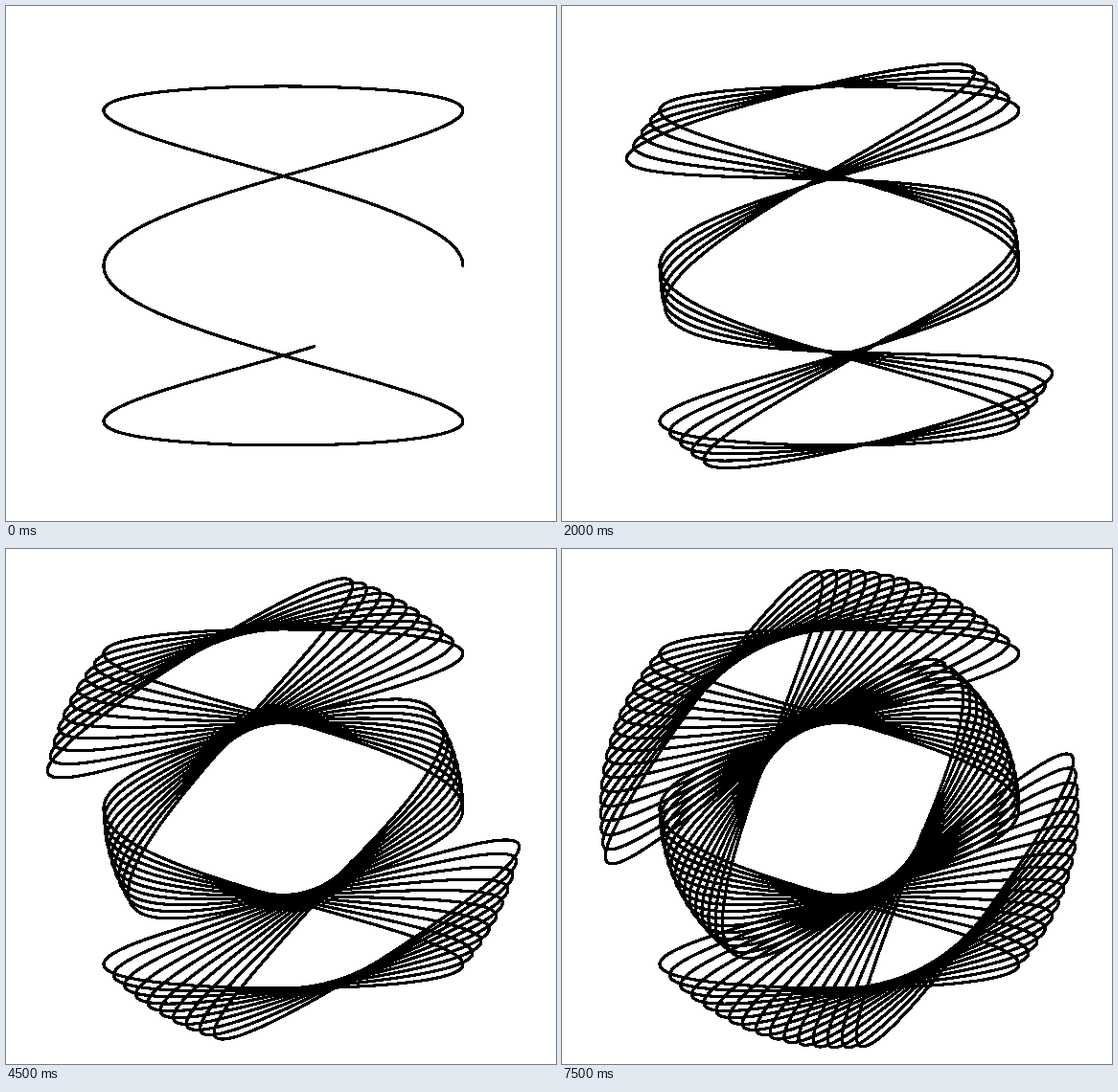
These frames come from a looping animation (574 px wide and 538 px high, 8 s). An HTML page:

```html
<!DOCTYPE html>
<html lang="en">
<head>
<meta charset="utf-8">
<title>Rotating Lissajous curve</title>
<style>
  html, body { margin: 0; width: 100%; height: 100%; overflow: hidden; background: #fff; }
  svg { display: block; }
  path { fill: none; stroke: #000; stroke-width: 2.1; stroke-linecap: round; stroke-linejoin: round; }
</style>
</head>
<body>
<!-- Half-pixel copies blacken every pixel that the thin stroke touches -->
<svg width="574" height="538" viewBox="0 0 574 538" shape-rendering="crispEdges">
  <defs><g id="curves"></g></defs>
  <use href="#curves" x="-.5" y="-.5"/>
  <use href="#curves" x=".5" y="-.5"/>
  <use href="#curves" x="-.5" y=".5"/>
  <use href="#curves" x=".5" y=".5"/>
</svg>
<script>
const COUNT = 16, STEP_MS = 500, TURN = 3.6 * Math.PI / 180;
const CX = 289.45, CY = 271.45, SIZE = 187.5;
const SEGMENTS = 499, OPEN_SEGMENTS = 462;
const group = document.getElementById('curves');

// Lissajous curve (cos 3t, sin t), turned counterclockwise by the given angle
function curve(angle, segments) {
  const c = Math.cos(angle), s = Math.sin(angle);
  const points = [];
  for (let i = 0; i <= segments; i++) {
    const t = i / SEGMENTS * 2 * Math.PI;
    const x = Math.cos(3 * t), y = Math.sin(t);
    const px = CX + SIZE * (x * c - y * s);
    const py = CY - SIZE * (x * s + y * c);
    points.push(px.toFixed(2) + ' ' + py.toFixed(2));
  }
  return 'M' + points.join('L');
}

const curves = Array.from({ length: COUNT }, (_, i) => ({
  path: group.appendChild(document.createElementNS('http://www.w3.org/2000/svg', 'path')),
  full: curve(i * TURN, SEGMENTS),
  open: curve(i * TURN, OPEN_SEGMENTS)
}));

// The newest curve stays open until the next one begins
let shown = -1;
function draw(now) {
  const step = Math.floor(now / STEP_MS) % COUNT;
  if (step !== shown) {
    shown = step;
    curves.forEach(({ path, full, open }, i) =>
      path.setAttribute('d', i < step ? full : i === step ? open : ''));
  }
}

const start = performance.now();
function tick() {
  draw(performance.now() - start);
  requestAnimationFrame(tick);
}
tick();
</script>
</body>
</html>
```
